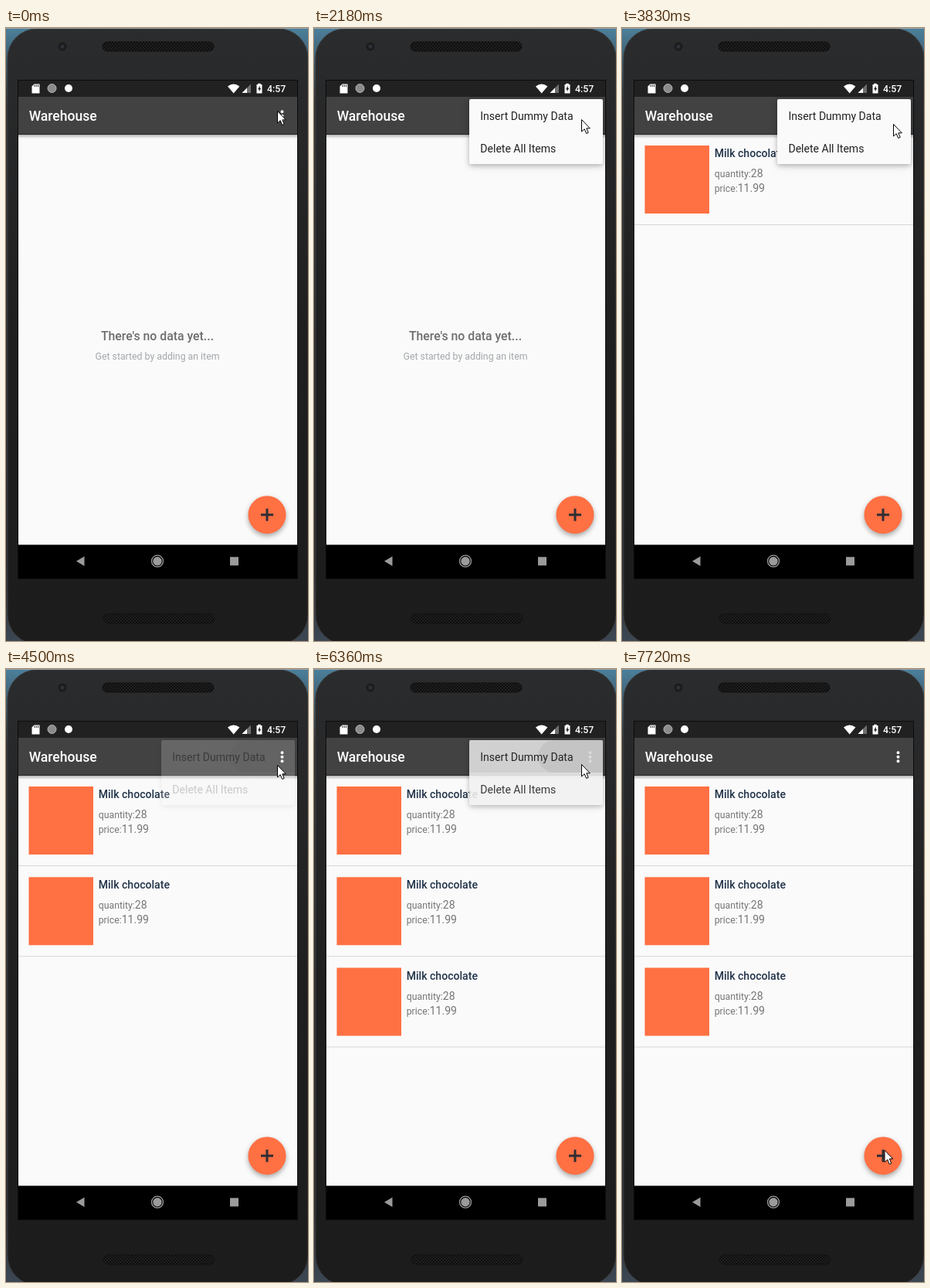
Write an HTML page that moves like this. It is 391x793 px and loops after 8 s.

```html
<!DOCTYPE html>
<html lang="en">
<head>
<meta charset="utf-8">
<title>Warehouse</title>
<style>
html, body { margin: 0; width: 100%; height: 100%; overflow: hidden; background: #222; }
body { position: relative; font-family: Roboto, sans-serif; }
svg { position: absolute; left: 0; top: 0; }
.b { font-weight: 500; }
#menu { position: absolute; top: 92px; overflow: hidden; border-radius: 2px; background: #fafafa;
  box-shadow: 0 2px 6px #0004, 0 4px 14px #0001; }
#list { position: absolute; width: 173px; height: 84px; font-size: 14.05px; color: #212121; }
#list span { position: absolute; left: 14.3px; top: 1px; line-height: 42px; white-space: pre; }
#list span + span { top: 43px; }
#press { position: absolute; inset: 0; background: #00000008; }
#press div { height: 42px; background: #0000000f; }
#press div div { margin-left: 89px; border-radius: 21px 0 0 21px; }
</style>
</head>
<body>
<svg width="391" height="793">
  <defs>
    <linearGradient id="back" x2="0" y2="1">
      <stop offset="0" stop-color="#4c809c"/><stop offset=".12" stop-color="#303436"/>
      <stop offset=".88" stop-color="#2b2f33"/><stop offset="1" stop-color="#3c4754"/>
    </linearGradient>
    <linearGradient id="body" x2="0" y2="1">
      <stop offset="0" stop-color="#2b2c2d"/><stop offset=".5" stop-color="#1f1f20"/>
      <stop offset="1" stop-color="#1c1c1c"/>
    </linearGradient>
    <linearGradient id="shade" x2="0" y2="1">
      <stop offset="0" stop-opacity=".35"/><stop offset="1" stop-opacity="0"/>
    </linearGradient>
    <pattern id="mesh" width="4" height="4" patternUnits="userSpaceOnUse">
      <rect width="4" height="4" fill="#202020"/>
      <circle cx="1" cy="1" r="1" fill="#080808"/><circle cx="3" cy="3" r="1" fill="#080808"/>
    </pattern>
    <rect id="speaker" width="144" height="12" rx="6" fill="url(#mesh)" stroke="#111"/>
  </defs>

  <rect width="391" height="793" fill="url(#back)"/>
  <rect x="2" y="1" width="389" height="796" rx="38" fill="url(#body)" stroke="#3c3d3e"/>
  <rect width="391" height="1" fill="#a0a4a6"/>
  <use href="#speaker" x="125" y="18"/>
  <use href="#speaker" x="126" y="758"/>
  <circle cx="73" cy="24" r="4" fill="#2c3238" stroke="#1b1c1d" stroke-width="3"/>

  <rect x="15" y="67" width="363" height="646" fill="#0c0c0c"/>
  <rect x="16" y="138" width="361" height="531" fill="#fafafa"/>
  <g id="empty" text-anchor="middle">
    <text class="b" x="196" y="404" font-size="15.8" fill="#6d6d6d">There's no data yet...</text>
    <text x="196" y="429" font-size="12.3" fill="#a3a7aa">Get started by adding an item</text>
  </g>
  <g id="items"></g>

  <rect x="16" y="137" width="361" height="6" fill="url(#shade)"/>
  <rect x="16" y="89" width="361" height="48.5" fill="#424242"/>
  <rect x="16" y="68" width="361" height="21" fill="#212121"/>
  <rect x="16" y="668.5" width="361" height="43.5"/>
  <g fill="#fff">
    <text class="b" x="29.7" y="120" font-size="17.56">Warehouse</text>
    <text class="b" x="338" y="82.5" font-size="12.3">4:57</text>
    <path d="M357.5 108.3v12" stroke="#fff" stroke-width="4" stroke-linecap="round" stroke-dasharray="0 5.5"/>
    <path d="M36.5 72.5h7v12h-10v-9Z"/>
    <circle cx="81" cy="78" r="5"/>
    <path d="M287 75.5q7.7-6 15.4 0l-7.7 9Z"/>
    <path d="M317 72.5V84h-11.5Z" opacity=".35"/><path d="M312 77.5V84h-6.5Z"/>
    <path d="M326.3 71.8h3.4V73h1.8v11.5h-7V73h1.8Z"/>
  </g>
  <path d="M36.5 74.7h6" stroke="#212121" stroke-width="2.5" stroke-dasharray="1 1.3"/>
  <path d="M328.7 74.5l-2.7 5h1.7v3l2.5-4.7h-1.5Z" fill="#212121"/>
  <circle cx="59.5" cy="78" r="5.5" fill="#8b8b8b" stroke="#b5b5b5"/>
  <g fill="#9b9b9b">
    <path d="M91 689.7l10.5-6.2V696Z"/>
    <circle cx="196" cy="689.7" r="5.7"/>
    <circle cx="196" cy="689.7" r="7.5" fill="none" stroke="#9b9b9b" stroke-width="1.3"/>
    <rect x="290" y="684.3" width="11" height="11"/>
  </g>
  <circle cx="338" cy="629.7" r="24.5" fill="#ff7043" style="filter:drop-shadow(0 3px 3px #0005)"/>
  <path d="M330 629.7h16m-8-8v16" stroke="#2f2d33" stroke-width="3"/>
</svg>

<div id="menu">
  <div id="list">
    <div id="press"><div><div></div></div></div>
    <span>Insert Dummy Data</span><span>Delete All Items</span>
  </div>
</div>

<svg width="391" height="793">
  <path id="cursor" d="M.5.5V16l3.7-3.3 2.5 5.8 2.5-1.1-2.4-5.6h4.5Z" fill="#fff" stroke="#000"/>
</svg>

<script>
const $ = id => document.getElementById(id);
const LOOP = 8000, STEP = 120, PITCH = 117.25;

// The menu opens every OPEN_EVERY ms; each click in it adds an item
const OPEN_FIRST = 1420, OPEN_EVERY = 2015;
const clicks = [2420, 4350, 6360];

// Cursor moves: start time, number of steps, end point
const moves = [
  [1660, 2, 346, 115], [2060, 2, 346, 118], [2660, 2, 351, 118], [2930, 2, 362, 118],
  [3710, 2, 351, 124], [4900, 2, 357, 122], [5840, 2, 346, 123],
  [6940, 3, 321, 498], [7360, 4, 339.5, 622]
];

const stepsSince = (t, start) => Math.floor((t - start) / STEP) + 1;

function cursorAt(t) {
  let x = 351, y = 107;
  for (const [start, count, endX, endY] of moves) {
    const p = Math.min(1, Math.max(0, stepsSince(t, start) / count));
    x += (endX - x) * p;
    y += (endY - y) * p;
  }
  return [x, y];
}

function menuAt(t) {
  const round = Math.floor((t - OPEN_FIRST) / OPEN_EVERY);
  if (!(round in clicks)) return { open: 0, alpha: 0 };
  const opened = stepsSince(t, OPEN_FIRST + round * OPEN_EVERY);
  const pressed = t >= clicks[round];
  const faded = Math.floor((t - clicks[round]) / 150);
  const alpha = pressed ? [.88, .22][faded] ?? 0 : 1;
  return { open: 1 - .2 ** opened, alpha, pressed };
}

$('items').innerHTML = clicks.map((_, i) => `
  <g transform="translate(0 ${i * PITCH})">
    <rect x="29.5" y="152" width="83.5" height="88" fill="#ff7043"/>
    <text class="b" x="119.7" y="167" font-size="14.05" fill="#22344a">Milk chocolate</text>
    <g font-size="12.3" fill="#757575">
      <text x="119.7" y="193">quantity:<tspan font-size="14.05">28</tspan></text>
      <text x="119.7" y="212">price:<tspan font-size="14.05">11.99</tspan></text>
    </g>
    <rect x="16" y="254" width="361" height="1" fill="#d8d8d8"/>
  </g>`).join('');
const items = [...$('items').children];
const show = (el, on) => el.style.display = on ? '' : 'none';

function draw(t) {
  $('cursor').setAttribute('transform', `translate(${cursorAt(t)})`);

  const { open, alpha, pressed } = menuAt(t), hidden = 1 - open;
  Object.assign($('menu').style, {
    left: 201 + 173 * hidden + 'px',
    width: 173 * open + 'px',
    height: 84.5 * open + 'px',
    opacity: alpha
  });
  $('list').style.transform = `translate(${-86 * hidden}px, ${-42 * hidden}px)`;
  show($('press'), pressed);

  items.forEach((item, i) => show(item, t >= clicks[i]));
  show($('empty'), t < clicks[0]);
}

function tick() {
  draw(performance.now() % LOOP);
  requestAnimationFrame(tick);
}
tick();
</script>
</body>
</html>
```
